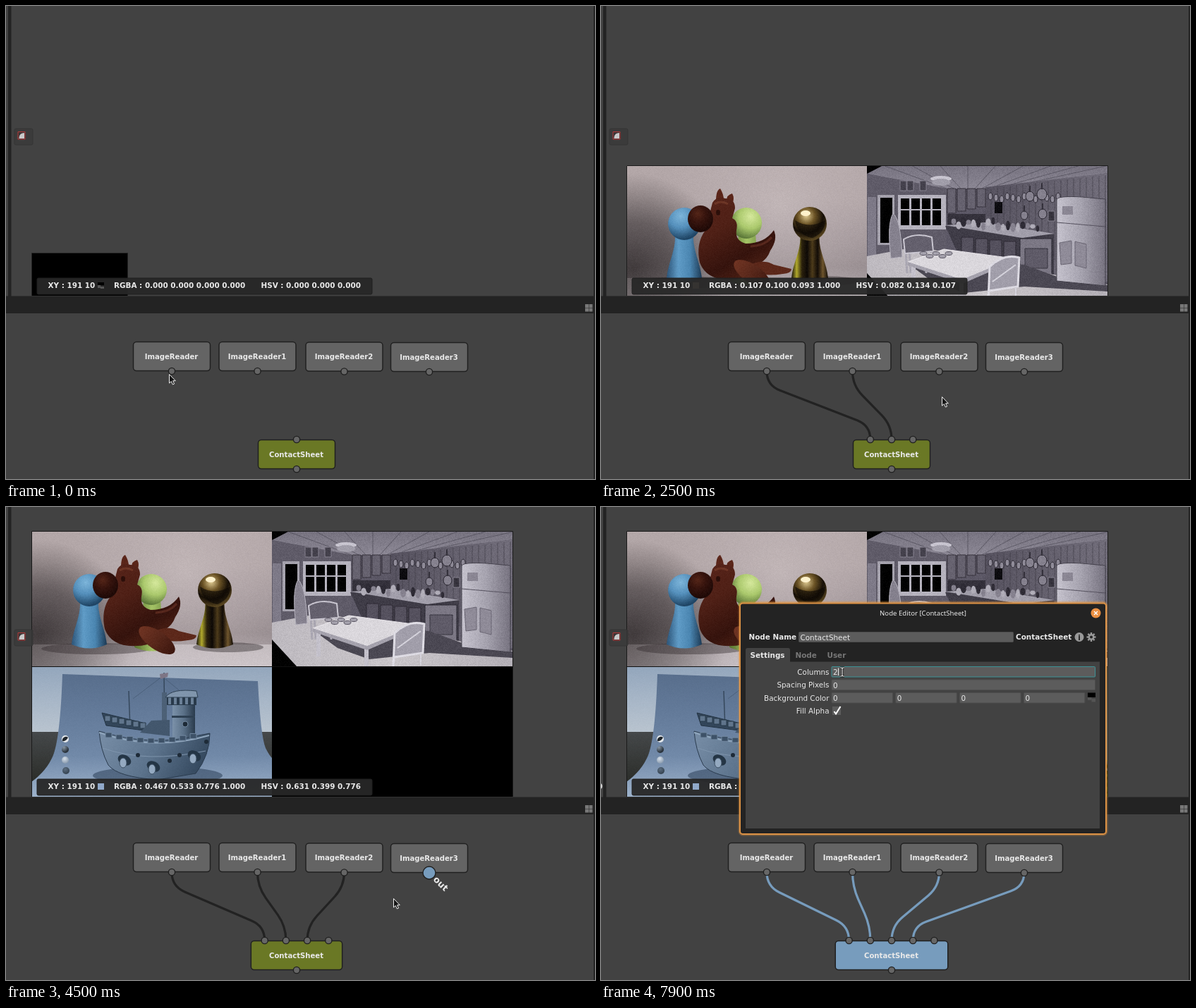
These frames come from a looping animation (835x671 px, 8 s). An HTML page with a canvas:

```html
<!DOCTYPE html>
<html lang="en">
<head>
<meta charset="utf-8">
<title>Contact sheet node graph</title>
<style>
html, body { margin: 0; width: 100%; height: 100%; overflow: hidden; background: #424242; }
canvas { display: block; }
</style>
</head>
<body>
<canvas id="stage" width="835" height="671"></canvas>
<script>
const main = document.getElementById('stage').getContext('2d');
const BLUE = '#779cbd', DARK = '#232323', BG = '#424242', EDGE = '#202020';
let g = main;

// ---------- drawing helpers ----------
let seed = 7;
const rnd = (a = 0, b = 1) => {
  seed = (seed * 16807) % 2147483647;
  return a + (b - a) * seed / 2147483647;
};
function stops(gr, cols) {
  cols.forEach((c, i) => gr.addColorStop(i / (cols.length - 1), c));
  return gr;
}
const lin = (x0, y0, x1, y1, ...c) => stops(g.createLinearGradient(x0, y0, x1, y1), c);
const rad = (x, y, r, ...c) => stops(g.createRadialGradient(x, y, 0, x, y, r), c);
function paint(p, fill, stroke, w = 1) {
  if (fill) { g.fillStyle = fill; g.fill(p); }
  if (stroke) { g.strokeStyle = stroke; g.lineWidth = w; g.stroke(p); }
}
const shape = (d, fill, stroke, w) => paint(new Path2D(d), fill, stroke, w);
function box(x, y, x2, y2, fill, stroke, r = 0, w = 1) {
  const p = new Path2D();
  p.roundRect(x, y, x2 - x, y2 - y, r);
  paint(p, fill, stroke, w);
}
function oval(x, y, rx, ry, fill, stroke, w, rot = 0) {
  const p = new Path2D();
  p.ellipse(x, y, rx, ry, rot, 0, 7);
  paint(p, fill, stroke, w);
}
function text(s, x, y, { size = 10.4, weight = 'bold', color = '#e9e9e9', align = 'left', family = '"DejaVu Sans"' } = {}) {
  g.font = `${weight} ${size}px ${family}, sans-serif`;
  g.textAlign = align;
  g.textBaseline = 'alphabetic';
  g.fillStyle = color;
  g.fillText(s, x, y);
}

// ---------- rendered pictures, in stage coordinates of their grid cell ----------
function scene(x, y, grain, draw) {
  const c = document.createElement('canvas');
  c.width = 341; c.height = 191;
  g = c.getContext('2d');
  g.translate(-x, -y);
  draw();
  const d = g.getImageData(0, 0, 341, 191);
  for (let i = 0; i < d.data.length; i += 4) {
    const n = rnd(-grain, grain);
    for (let k = 0; k < 3; k++) d.data[i + k] += n;
  }
  g.putImageData(d, 0, 0);
  g = main;
  return c;
}
// concave cone from the neck down to a rounded base
const pawn = (x, top, r, half, base, fill) => {
  const neck = top + 2 * r - 4, n = r * .56;
  shape(`M${x - n} ${neck}C${x - n} ${neck + 20} ${x - half + 2} ${base - 26} ${x - half} ${base - 5}Q${x} ${base + 6} ${x + half} ${base - 5}C${x + half - 2} ${base - 26} ${x + n} ${neck + 20} ${x + n} ${neck}Z`, fill);
};

const toys = scene(36, 35, 4, () => {
  box(36, 35, 377, 226, lin(0, 35, 0, 226, '#b3a7a8', '#b1a5a6', '#a2979a', '#958b8e', '#b8afb3'));
  box(36, 35, 377, 226, rad(255, 95, 170, '#cabfc0aa', '#c0b4b666', '#c0b4b600'));
  box(36, 35, 377, 226, rad(45, 182, 135, '#2b2627cc', '#2f2a2b88', '#2f2a2b00'));
  box(36, 195, 377, 226, lin(36, 0, 377, 0, '#8e868866', '#d8d1d588', '#e0dadd88'));
  oval(128, 201, 78, 8, '#2b252766');
  oval(315, 199, 50, 7, '#3d363977');
  pawn(118, 95, 23, 25, 200, lin(93, 0, 143, 0, '#2c5478', '#5f9bc6', '#4b86b1', '#1d3a55'));
  oval(118, 118, 23, 23, rad(113, 107, 33, '#7db5da', '#5590bc', '#1f4565'));
  pawn(207, 95, 22, 25, 204, lin(182, 0, 232, 0, '#55702c', '#a5c466', '#6b8740'));
  oval(206, 117, 22, 22, rad(212, 108, 34, '#d5e89c', '#aac86c', '#4e6a30'));
  pawn(296, 94, 24, 26, 200, lin(270, 0, 322, 0, '#15100a', '#b0a82c', '#2b210d', '#0d0906', '#4c3a1a', '#120c07', '#6d542c', '#120d08'));
  oval(296, 118, 24, 24, rad(291, 107, 36, '#dcc78f', '#6b5325', '#150e06', '#5e4a22'));
  shape('M275 113Q295 126 318 113Q318 130 300 138Q279 135 275 113Z', '#0e0905aa');
  oval(290, 103, 7, 4, '#fff2cc');
  const fur = lin(150, 80, 225, 205, '#57241a', '#4f2016', '#35130d', '#592718');
  shape('M163 86Q163 70 169 68Q174 76 174 84ZM178 85Q178 77 186 75Q190 82 186 90Z', '#5a2519');
  shape('M158 88Q165 77 176 82Q190 82 190 96L186 110Q195 114 192 127Q190 142 205 146Q232 146 245 127Q251 140 240 156Q236 168 225 174Q214 197 185 197Q150 199 140 173Q134 146 148 127Z', fur);
  shape('M214 175Q232 168 245 176L270 182Q270 188 258 189Q234 193 217 187Z', '#5c281a');
  oval(214, 189, 30, 13, lin(190, 175, 235, 210, '#6e3322', '#57271a', '#3c160e'), 0, 0, .6);
  oval(141, 111, 18, 19, rad(137, 104, 24, '#542518', '#35130d', '#200a07'));
  oval(166, 102, 3, 4, '#2b0e09');
  shape('M161 90Q170 84 180 90', 0, '#8a4a3577', 3);
  shape('M212 150Q232 149 242 137', 0, '#8a483566', 3);
});

const kitchen = scene(377, 35, 8, () => {
  box(377, 35, 718, 226, '#5c5866');
  shape('M377 35H718V46L570 68H490L377 47Z', lin(0, 35, 0, 68, '#76727f', '#8b8794'));
  for (let i = 0; i < 9; i++) shape(`M${400 + i * 40} 35L${490 + i * 10} 68`, 0, '#4b4854aa');
  shape('M545 66L718 46V200H545Z', lin(545, 0, 718, 0, '#56525f', '#716d7a'));
  for (let x = 553; x < 718; x += 9) shape(`M${x} ${68 - (x - 545) / 9}V170`, 0, '#3d3a4599');
  shape('M377 47L490 68V160L377 165Z', '#5f5b68');
  // windows
  box(392, 77, 416, 148, '#a5a2ad');
  box(396, 81, 413, 145, '#000');
  box(421, 77, 489, 126, '#b5b2bd');
  for (let i = 0; i < 4; i++) {
    box(425 + i * 15, 82, 437 + i * 15, 97, '#000');
    box(425 + i * 15, 99, 437 + i * 15, 120, '#000');
  }
  shape('M378 80H390V165L378 186Z', '#7e7a88');
  for (const x of [424, 434, 452]) box(x, 57, x + 9, 71, '#44414c', '#85818e');
  // cupboards, lamp and hanging pans
  for (let i = 0; i < 4; i++) box(491 + i * 14, 68, 503 + i * 14, 103 - i * 3, '#66626f', '#34313b');
  box(491, 104, 545, 120, '#34313b');
  oval(482, 54, 15, 4, '#c8c5d0');
  oval(482, 59, 13, 5, '#a19eaa');
  for (let i = 0; i < 13; i++) oval(552 + i * 8, 79 + i % 3 * 2, 3, 5, '#8f8b98', '#2e2b35');
  for (const [x, y, r] of [[608, 79, 6], [625, 76, 7], [626, 104, 6], [600, 106, 5]]) {
    oval(x, y, r, r + 1, '#85818e', '#2b2832');
    shape(`M${x} ${y - r}V${y - r - 9}`, 0, '#34313b', 2);
  }
  box(558, 87, 569, 103, '#0d0c10');
  box(634, 100, 643, 114, '#37343e', '#85818e');
  // counter, stove, fridge
  shape('M488 121L600 127L642 133V196L592 190L505 158Z', '#3f3c47');
  shape('M488 120L545 116L642 132L597 138Z', '#a19eaa');
  for (let i = 0; i < 18; i++) oval(500 + i * 7, 121 + rnd(-7, 4), rnd(2, 4), rnd(3, 7), ['#85818e', '#b0adb8', '#2e2b35'][i % 3]);
  for (let i = 0; i < 4; i++) box(511 + i * 20, 137 + i * 2, 528 + i * 20, 168 + i * 5, '#55515e', '#2e2b35');
  box(594, 139, 639, 193, '#7b7784', '#2b2832');
  box(601, 153, 633, 181, '#5f5b68', '#37343e');
  shape('M377 164L450 150L560 175L718 204V226H377Z', lin(377, 0, 718, 0, '#bdb9bf', '#c9c5c9', '#b3afb6'));
  shape('M440 178L512 168L600 176L655 196L718 205V214L600 207L515 216L470 200Z', '#4b4853');
  shape('M646 83Q650 78 682 80L715 83V206L646 199Z', lin(646, 0, 716, 0, '#c5c2cd', '#a5a2ae', '#75717e'), '#45424d');
  shape('M646 116L715 122', 0, '#55515e');
  box(654, 93, 669, 105, '#8a8693');
  shape('M650 145L667 142V174L652 176ZM672 143L688 147V181L672 177Z', '#8f8b98', '#6b6774');
  // ironing board, chairs, table
  shape('M411 167Q405 119 414 103Q425 112 427 165Z', '#85818e', '#b5b2bd');
  for (const x of [431, 436, 458, 467]) shape(`M${x} 139L${x + 3} 188`, 0, '#aaa7b2', 3);
  shape('M429 140Q446 130 469 137L471 157L431 160Z', '#64606d', '#c9c6d0', 2);
  for (const [x, y, b] of [[440, 174, 212], [508, 194, 226], [578, 172, 204]]) box(x, y, x + 6, b, '#c3c0ca');
  shape('M435 172L486 154L584 167L512 197Z', '#dad7dc', '#e8e5ea');
  shape('M435 172L512 197L584 167V172L512 203L435 177Z', '#a5a2ad');
  for (let i = 0; i < 5; i++) oval(457 + i * 9, 160 + i % 2 * 4, 5, 2.5, '#a5a2ad', '#5a5663');
  shape('M549 226L551 179Q570 160 593 166L591 207L550 213Z', '#a19eaa', '#dddbe3', 3);
  shape('M555 200L588 176M588 207V224', 0, '#d5d3dc', 2);
  shape('M377 35H400L377 47ZM377 188L412 226H377Z', '#000');
});

const ship = scene(36, 226, 2, () => {
  box(36, 226, 377, 417, lin(0, 226, 0, 320, '#93a6bc', '#a7b6c7', '#b9c4cf'));
  box(36, 319, 377, 417, lin(0, 319, 0, 390, '#45484a', '#2b2d29'));
  shape('M80 237L357 247Q361 325 368 342Q373 352 377 356V417H36V390Q58 374 67 352Q77 325 80 237Z', lin(0, 237, 0, 411, '#586e8c', '#647b9a', '#7189a8', '#9db2cb'));
  oval(215, 381, 92, 13, '#33475f99');
  shape('M174 261L176 315M224 235L225 322', 0, '#36485c', 1.5);
  shape('M222 240L180 272M226 244L255 268', 0, '#36485c88', .8);
  shape('M218 237L230 235L229 241L219 244Z', '#7d7585');
  box(221, 263, 228, 306, '#4c6076');
  // crane and superstructure
  shape('M136 292L194 306L203 318L142 310Z', '#33465a', '#243545');
  for (let i = 0; i < 6; i++) box(140 + i * 10, 296 + i * 2, 148 + i * 10, 304 + i * 2, '#60758c', '#293a4b');
  shape('M190 320L206 303L232 302V325Z', '#43576d');
  box(236, 277, 268, 330, lin(236, 0, 268, 0, '#7b91a9', '#5a7087', '#293a4c'));
  box(228, 270, 270, 281, '#293a4b');
  for (let x = 230; x < 270; x += 8) box(x, 269, x + 4, 280, '#6b8097');
  shape('M226 270Q235 257 270 261L272 270Z', '#8095ac', '#2e4052');
  box(235, 296, 268, 299, '#2e4052');
  oval(254, 308, 4, 4, '#1d2a37', '#7288a0');
  // hull
  shape('M132 318Q205 341 273 324L289 321Q289 352 269 378L215 387Q158 383 145 366Q134 345 132 318Z', lin(145, 320, 265, 390, '#748aa3', '#5c738c', '#34485e'), '#2b3c4f');
  shape('M132 320Q208 347 288 324', 0, '#8fa5bc', 2);
  shape('M137 342Q200 364 283 346', 0, '#7f95ad', 1);
  for (let i = 0; i < 9; i++) box(141 + i * 15, 320 + 8 * Math.sin(i / 2.7), 150 + i * 15, 327 + 8 * Math.sin(i / 2.7), '#3d5167', '#71879f');
  for (const [x, y] of [[168, 359], [209, 368], [267, 353]]) {
    oval(x, y, 10, 7, '#243545', 0, 0, .5);
    oval(x - 2, y + 4, 5, 7, '#94a9c0', '#3c4f63');
  }
  for (const [x, y] of [[187, 352], [232, 360], [246, 352], [284, 333]]) oval(x, y, 3, 3, '#1d2a37');
  // reference spheres
  oval(84, 329, 5, 5, '#e4e8ec');
  shape('M80 332A5 5 0 0 1 88 327Q85 333 80 332Z', '#20262c');
  oval(84, 344, 5, 5, rad(82, 341, 7, '#8796a5', '#2a333c'));
  oval(84, 359, 5, 5, rad(83, 357, 7, '#d6dfe9', '#8799ad'));
  oval(85, 374, 5, 5, rad(84, 372, 7, '#5b6c7f', '#33414f'));
});

const meadow = scene(377, 226, 1, () => {
  box(377, 226, 718, 417, lin(0, 226, 0, 380, '#163449', '#275069', '#3d6b87'));
  box(377, 226, 718, 417, rad(655, 345, 220, '#86adc0cc', '#557f9a99', '#27516a44', '#143043aa'));
  const blades = (n, y0, y1) => {
    for (let i = 0; i < n; i++) {
      const x = rnd(372, 722), y = rnd(y0, y1), h = rnd(8, 20);
      g.strokeStyle = `hsl(${rnd(72, 95)} ${rnd(45, 65)}% ${rnd(7, 38)}%)`;
      g.lineWidth = rnd(.8, 2);
      g.beginPath();
      g.moveTo(x, y);
      g.quadraticCurveTo(x + rnd(-2, 2), y - h * .7, x + rnd(-9, 9), y - h);
      g.stroke();
    }
  };
  box(377, 374, 718, 417, '#1c350c');
  blades(260, 374, 384);
  pawn(547, 246, 29, 34, 373, lin(514, 0, 581, 0, '#0c3a41', '#17705c', '#0a4b41', '#0c5145', '#1a6457', '#4c8693'));
  shape('M536 306Q532 338 521 362M561 310Q567 340 576 364', 0, '#8fc2bf88', 1.5);
  oval(547, 275, 29, 29, rad(540, 283, 38, '#14775f', '#0b5648', '#083c3c', '#4a8795'), '#3b7480');
  oval(547, 302, 15, 3, '#08302f', '#7fb5ba');
  shape('M523 262Q520 276 525 288M571 262Q575 276 569 289', 0, '#a5d0d477', 2.5);
  blades(900, 391, 425);
  box(377, 360, 718, 417, lin(377, 0, 718, 0, '#0a160699', '#0a160600', '#0a160600', '#0a160622'));
});

// ---------- timeline ----------
const PATH = [
  [0, 231, 522], [100, 234, 518], [200, 238, 522], [900, 412, 617], [1100, 412, 617], [1200, 402, 592],
  [1300, 375, 546], [1500, 358, 523], [1700, 356, 520], [1800, 356, 520], [2200, 427, 617], [2300, 427, 617],
  [2400, 451, 594], [2500, 483, 554], [2800, 480, 520], [2900, 480, 520], [3400, 442, 617], [3500, 442, 617],
  [3600, 468, 602], [3700, 503, 573], [4300, 600, 520], [4400, 600, 520], [4500, 549, 555], [5000, 457, 617],
  [5200, 457, 617], [5700, 456, 640], [6300, 456, 640], [6400, 479, 639], [6800, 479, 639], [7700, 342, 234], [8000, 342, 234]
];
// per connection: plug hover, drag start, arrival, connected
const DRAGS = [[100, 200, 900, 1200], [1700, 1900, 2200, 2400], [2800, 3000, 3400, 3600], [4300, 4600, 5000, 5300]];
const READERS = [[235, 476.5], [356.5, 476.5], [479.5, 477], [600, 477.5]];

function pointerAt(t) {
  const i = Math.max(1, PATH.findIndex(k => k[0] >= t));
  const [a, b] = [PATH[i - 1], PATH[i]], f = (t - a[0]) / (b[0] - a[0]);
  return [a[1] + (b[1] - a[1]) * f, a[2] + (b[2] - a[2]) * f];
}

// ---------- viewer ----------
function viewer(t, links) {
  box(0, 0, 835, 671, BG);
  g.save();
  g.beginPath(); g.rect(7, 0, 826, 411); g.clip();
  if (links === 0) box(36.5, 350.5, 172.5, 420, '#000', '#222');
  else if (links < 3) {
    g.drawImage(toys, 36, 226);
    if (links === 2) g.drawImage(kitchen, 377, 226);
    box(36.5, 226.5, links === 2 ? 718.5 : 377.5, 420, 0, '#1c1c1c');
    if (links === 1) {
      shape('M36 350.5H172.5V411', 0, '#211f20');
      text('(1280 720)', 376.5, 222, { size: 7.4 });
    }
  } else {
    const partial = t < 3800;
    box(36, 35, 719, 420, '#000');
    g.drawImage(toys, 36, 35);
    g.drawImage(kitchen, 377, 35);
    if (partial) box(36, 43, 719, 226, '#000');
    g.drawImage(partial ? toys : ship, 36, 226);
    if (partial) g.drawImage(kitchen, 377, 226);
    if (links === 4) g.drawImage(meadow, 377, 226);
    box(36.5, 34.5, 718.5, 420, 0, '#1a1a1a');
    shape('M36 226.5H718', 0, '#111');
  }
  g.restore();
  box(12, 174, 38, 197, '#3a3a3acc', '#353535', 2);
  box(17, 178.5, 27, 189, '#3a3435', '#b53a3a');
  shape('M18.5 188V187Q19 180 26 180V188Z', '#c9c9c9');
  box(44, 386, 519, 409, '#272727f2', '#1f1f1f', 2);
  const v = links === 0 ? ['0.000 0.000 0.000 0.000', '0.000 0.000 0.000']
    : t < 3800 ? ['0.107 0.100 0.093 1.000', '0.082 0.134 0.107']
    : ['0.467 0.533 0.776 1.000', '0.631 0.399 0.776'];
  if (links) box(130, 392, 139, 401, t < 3800 ? '#353331' : '#90a8c9');
  else {
    box(130, 392, 139, 396, '#000');
    box(130, 396, 134, 400, '#555');
    box(134, 398, 139, 401, '#555');
  }
  text('XY : 191 10', 59.5, 400);
  text('RGBA : ' + v[0], 153, 400);
  text('HSV : ' + v[1], 361.5, 400);
  box(3, 0, 7.5, 412, DARK);
  if (t >= 6600) text('0', -5, 400);
  box(0, 411.5, 835, 436, DARK);
  box(833, 0, 835, 671, DARK);
  for (const [x, y] of [[821, 423], [826.5, 423], [821, 428.5], [826.5, 428.5]]) box(x, y, x + 5, y + 5, '#777');
}

// ---------- node graph ----------
function wire(x0, y0, x1, y1, color) {
  const len = Math.hypot(x1 - x0, y1 - y0), k = Math.min(20, len / 4);
  const ya = y0 + k, yb = y1 - k, d = Math.hypot(x1 - x0, yb - ya) || 1;
  const ux = (x1 - x0) / d * k, uy = (yb - ya) / d * k;
  g.lineCap = 'round';
  shape(`M${x0} ${y0}Q${x0} ${ya} ${x0 + ux} ${ya + uy}L${x1 - ux} ${yb - uy}Q${x1} ${yb} ${x1} ${y1}`, 0, color, 3.2);
  g.lineCap = 'butt';
}
function node(x, y, w, label, fill) {
  box(x - w / 2, y, x + w / 2, y + 41, fill, EDGE, 4.5, 1.5);
  text(label, x - .5, y + 24, { size: 10.1, align: 'center' });
}
const plug = (x, y, hot) => oval(x, y, hot ? 9 : 4.6, hot ? 9 : 4.6, hot ? BLUE : '#666', EDGE, 1.4);
function plugLabel(s, x, y, hot, out) {
  g.save();
  g.translate(x, y);
  g.rotate(Math.PI / 4);
  text(s, out ? 11 : hot ? -10 : -8, 4, { size: hot ? 12.6 : 10.4, align: out ? 'left' : 'right' });
  g.restore();
}
function graph(t, links, px, py) {
  const n = links + 1, selected = t >= 6600;
  const plugX = i => 412 + (i - (n - 1) / 2) * 30.2;
  const drag = DRAGS.findIndex(d => t >= d[0] && t < d[3]);
  const [, start, arrive] = DRAGS[drag] || [];
  const over = drag >= 0 && t >= arrive;
  for (let i = 0; i < links; i++) wire(READERS[i][0], 518, plugX(i), 615, selected ? BLUE : '#222');
  if (drag >= 0 && t >= start) wire(READERS[drag][0], 518, over ? plugX(drag) : px, over ? 615 : py, BLUE);
  READERS.forEach(([x, y], i) => {
    node(x, y, 109, 'ImageReader' + (i || ''), '#646464');
    plug(x, y + 41.5, i === drag);
  });
  node(412, 615.5, Math.max(109, n * 30.2 + 8.5), 'ContactSheet', selected ? BLUE : '#6a7825');
  const hotIn = over ? drag : t >= 3600 && t < 3800 ? 3 : -1;
  for (let i = 0; i < n; i++) plug(plugX(i), 615, i === hotIn);
  plug(412, 657, false);
  if (hotIn >= 0)
    for (let i = 0; i < n; i++) plugLabel('ImagePlug' + (i || ''), plugX(i), 615, i === hotIn);
  if (drag >= 0 && t < start) plugLabel('out', READERS[drag][0], 518.5, true, true);
}

// ---------- node editor ----------
function editor(t) {
  const onColumns = t >= 7900, plain = { weight: 'normal' };
  const field = (x, y, x2, y2, s, focus) => {
    box(x, y, x2, y2, '#5c5c5c', focus ? '#3d9296' : '#4d4d4d', 1);
    text(s, x + 2, y + 11.5, plain);
  };
  box(196, 135, 717, 465, 0, '#e8963c55', 5, 3);
  box(197, 136.5, 716, 464, DARK, '#dc9245', 4, 2);
  text('Node Editor [ContactSheet]', 456.5, 154, { size: 9.6, weight: 500, align: 'center', family: '"Noto Sans"' });
  oval(701.5, 150.5, 7, 7, '#ec9042');
  shape('M699 148L704 153M704 148L699 153', 0, '#fff', 1.4);
  text('Node Name', 209.5, 188);
  field(280.5, 177.5, 584.5, 191.5, 'ContactSheet', !onColumns);
  text('ContactSheet', 588, 188);
  oval(678, 184.5, 6.5, 6.5, '#999');
  text('i', 678, 188.5, { color: DARK, align: 'center' });
  for (let i = 0; i < 8; i++) {
    const a = i * Math.PI / 4, c = Math.cos(a), s = Math.sin(a);
    shape(`M${695 + c * 3} ${184.5 + s * 3}L${695 + c * 6.5} ${184.5 + s * 6.5}`, 0, '#999', 2.4);
  }
  oval(695, 184.5, 3.2, 3.2, DARK, '#999', 2.4);
  box(205, 219.5, 707, 456, BG);
  box(205, 200, 268, 224, BG, 0, [3, 3, 0, 0]);
  text('Settings', 211.5, 213.5);
  text('Node', 275.5, 213.5, { color: '#777' });
  text('User', 320.5, 213.5, { color: '#777' });
  [['Columns', 237.5], ['Spacing Pixels', 256], ['Background Color', 274.5], ['Fill Alpha', 292.5]]
    .forEach(([s, y]) => text(s, 323.5, y, { ...plain, align: 'right' }));
  field(327, 226.5, 700.5, 241, '2', onColumns);
  field(327, 245, 700.5, 259.5, '0');
  for (let i = 0; i < 4; i++) field(327 + i * 90.8, 263.5, 413.5 + i * 90.8, 278, '0');
  box(690, 263.5, 701, 270, '#000');
  box(690, 270, 695.5, 274, '#555');
  box(695.5, 272, 701, 276.5, '#555');
  box(328, 283, 340, 295, '#5c5c5c');
  shape('M330.5 290L333 293.5L339.5 283', 0, '#fff', 2);
  if (onColumns) shape('M336.5 228.5V239', 0, '#eee');
}

function cursor(t, x, y) {
  g.save();
  g.translate(x, y);
  if (t >= 7700) {
    const beam = 'M-3 -6H-1L0 -5L1 -6H3M0 -5V5M-3 6H-1L0 5L1 6H3';
    shape(beam, 0, '#111', 3);
    shape(beam, 0, '#eee', 1.2);
  } else shape('M.5 .5V13L3.3 10.5L5.4 15L7.6 14L5.6 9.7H9.3Z', '#151515', '#eee', 1);
  g.restore();
}

function frame(now) {
  const t = Math.floor(now % 8000 / 100) * 100;
  const links = DRAGS.filter(d => t >= d[3]).length;
  const [x, y] = pointerAt(t);
  viewer(t, links);
  graph(t, links, x, y);
  if (t >= 6900) editor(t);
  cursor(t, x, y);
  requestAnimationFrame(frame);
}
requestAnimationFrame(frame);
</script>
</body>
</html>
```
